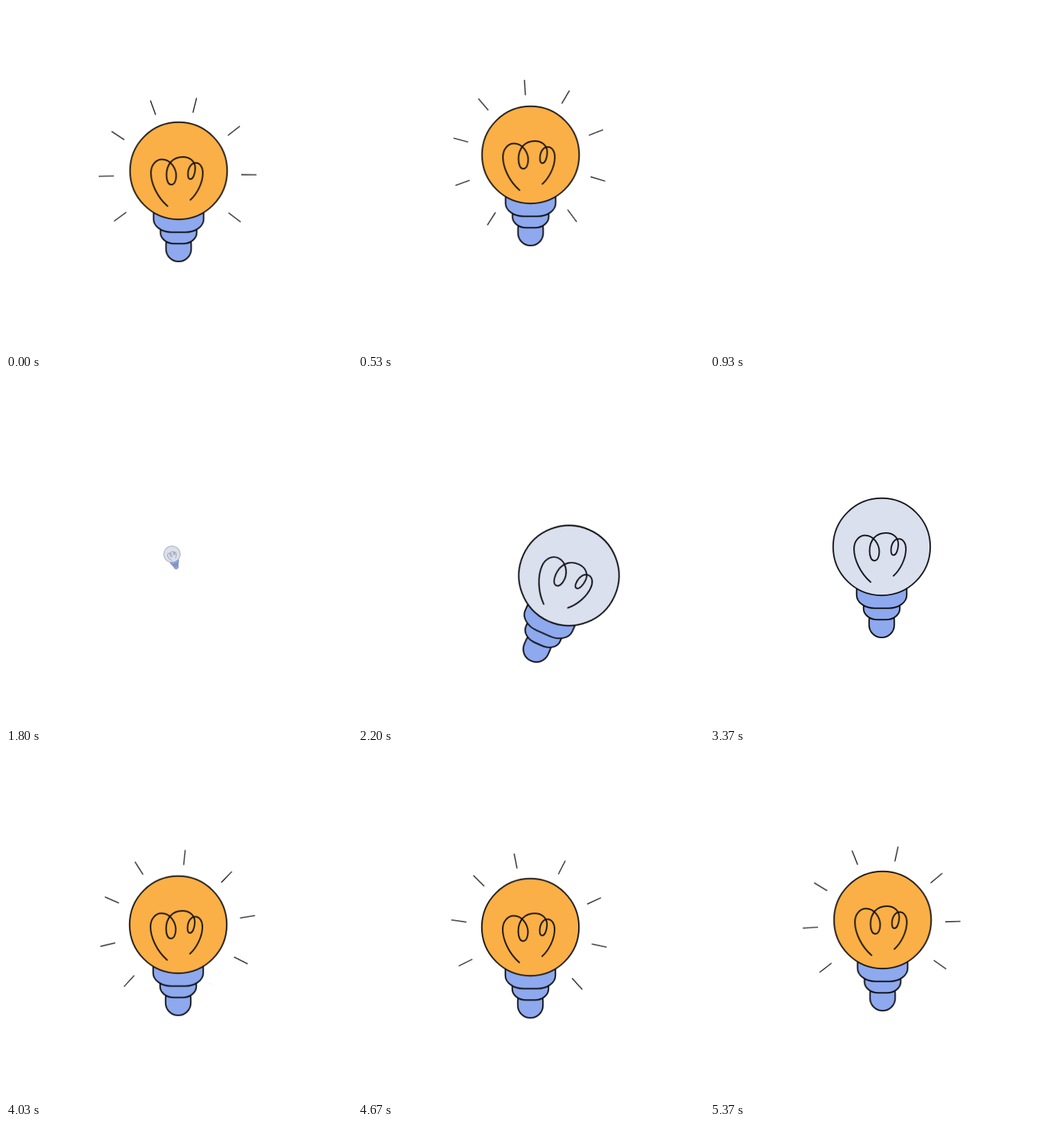
An HTML page without scripts that plays this animation: 500 px wide and 500 px high, repeating every 5410 ms.

```html
<!DOCTYPE html>
<html lang="en">
<head>
<meta charset="utf-8">
<title>Light bulb</title>
<style>
  html, body { margin: 0; width: 100%; height: 100%; overflow: hidden; background: #fff; }
  svg { display: block; width: 100%; height: 100%; }

  .pop, .bob, .swing, .exit, .spin, .rays, .glass {
    animation-duration: 5410ms;
    animation-iteration-count: infinite;
    animation-timing-function: linear;
  }
  .pop { animation-name: pop; transform-origin: 250px 250px; }
  .bob { animation-name: bob; }
  .swing { animation-name: swing; transform-origin: 0 131px; animation-timing-function: ease-in-out; }
  .exit { animation-name: exit; }
  .spin { animation-name: spin; }
  .rays { animation-name: rays; stroke: #0b0b0d; stroke-width: 1.4; stroke-dasharray: 22 40; }
  .glass { animation-name: glass; }

  .ink { stroke: #0b0b0d; stroke-width: 2; }
  .base { fill: #8ea9ee; }
  .wire { fill: none; stroke-linecap: round; }

  /* growing in from the middle of the stage */
  @keyframes pop {
    0%, 17.2% { transform: scale(1); }
    17.21%, 33.24% { transform: scale(0); }
    33.25%, 33.3% { transform: scale(.17); }
    37% { transform: scale(.96); }
    40%, 42.3% { transform: scale(1.03); }
    43.8%, 100% { transform: scale(1); }
  }
  @keyframes swing {
    0%, 17.2% { transform: none; }
    17.21%, 33.3% { transform: translateX(-18px) rotate(-18.5deg); }
    37% { transform: translateX(-9px) rotate(-30deg); }
    40.3% { transform: translateX(0) rotate(26deg); }
    42.4% { transform: translateX(0) rotate(-4deg); }
    43.8%, 100% { transform: translateX(0) rotate(0deg); }
  }
  /* slow floating */
  @keyframes bob {
    0% { transform: translate(249.4px, 238.2px); }
    9.8% { transform: translate(249.4px, 215.2px); }
    11% { transform: translate(249.4px, 212px); }
    17.2% { transform: translate(249.4px, 210px); }
    17.21%, 33.3% { transform: translate(250px, 254px); }
    38% { transform: translate(250px, 256px); }
    42.3% { transform: translate(250px, 279px); }
    43.8% { transform: translate(250px, 278px); }
    49.35% { transform: translate(250px, 260.5px); }
    53.6% { transform: translate(249.3px, 248.5px); }
    58% { transform: translate(248.2px, 242px); }
    62.3% { transform: translate(248.1px, 241px); }
    65% { transform: translate(248.1px, 241.3px); }
    74.5% { transform: translate(248.8px, 246.6px); }
    82% { transform: translate(249px, 251.2px); }
    86% { transform: translate(249.1px, 250.5px); }
    96% { transform: translate(249.4px, 244.5px); }
    99.26% { transform: translate(249.4px, 239.9px); }
    100% { transform: translate(249.4px, 238.2px); }
  }
  /* stretch tall, then flatten away */
  @keyframes exit {
    0%, 11.1% { transform: scale(1); }
    13.2% { transform: scale(1.02, 1.137); }
    15% { transform: scale(1.3, .7); }
    17.1% { transform: scale(1.75, .02); }
    17.2%, 33% { transform: scale(0); }
    33.1%, 100% { transform: scale(1); }
  }
  @keyframes spin {
    0% { transform: rotate(0deg); }
    9.8% { transform: rotate(16.4deg); }
    17.2% { transform: rotate(28deg); }
    17.21%, 64.5% { transform: rotate(-64deg); }
    74.5% { transform: rotate(-46.3deg); }
    99.26% { transform: rotate(-1.9deg); }
    100% { transform: rotate(0deg); }
  }
  @keyframes rays {
    0%, 17.2% { stroke-dashoffset: 0; visibility: visible; }
    17.21%, 64.7% { stroke-dashoffset: 22; visibility: hidden; }
    64.71% { stroke-dashoffset: 22; visibility: visible; }
    67%, 100% { stroke-dashoffset: 0; visibility: visible; }
  }
  @keyframes glass {
    0%, 17.2% { fill: #fab046; }
    17.21%, 64.7% { fill: #dbe0ef; }
    66.5%, 100% { fill: #fab046; }
  }
</style>
</head>
<body>
<svg viewBox="0 0 500 500">
  <defs><path id="ray" d="M0-92V-114"/></defs>
  <g class="pop"><g class="bob"><g class="swing"><g class="exit">
    <g transform="translate(-1.4 5.4)">
      <g class="rays"><g class="spin">
        <use href="#ray" transform="rotate(339.8)"/>
        <use href="#ray" transform="rotate(13.9)"/>
        <use href="#ray" transform="rotate(52.1)"/>
        <use href="#ray" transform="rotate(90.2)"/>
        <use href="#ray" transform="rotate(126.9)"/>
        <use href="#ray" transform="rotate(163)"/>
        <use href="#ray" transform="rotate(196)"/>
        <use href="#ray" transform="rotate(233.7)"/>
        <use href="#ray" transform="rotate(268.7)"/>
        <use href="#ray" transform="rotate(303.1)"/>
      </g></g>
      <!-- hides rays passing below the bulb -->
      <circle cx="1" cy="131" r="69.5" fill="#fff"/>
    </g>
    <g class="ink base">
      <rect x="-18.2" y="88" width="36.4" height="43" rx="18"/>
      <rect x="-26.2" y="66" width="52.4" height="39.3" rx="20" ry="16"/>
      <rect x="-36.2" y="40" width="72.4" height="48.7" rx="26" ry="19"/>
    </g>
    <circle class="ink glass" r="70.2"/>
    <path class="ink wire" d="M-16 51C-31 38-40 18-40 3C-40-8-33-16.5-24-16.5C-12-16.5-3.5-4-3.5 7C-3.5 14-6 20-10.5 20C-15 20-17.5 14-17.5 6C-17.5-10-8-20 6-20C16-20 24-14 24-4C24 4 21 12 17 12C14.5 12 13.5 9 13.5 5C13.5-4 18-11.5 25-11.5C31-11.5 35-5 35 3C35 17 27 33 17 42"/>
  </g></g></g></g>
</svg>
</body>
</html>
```
